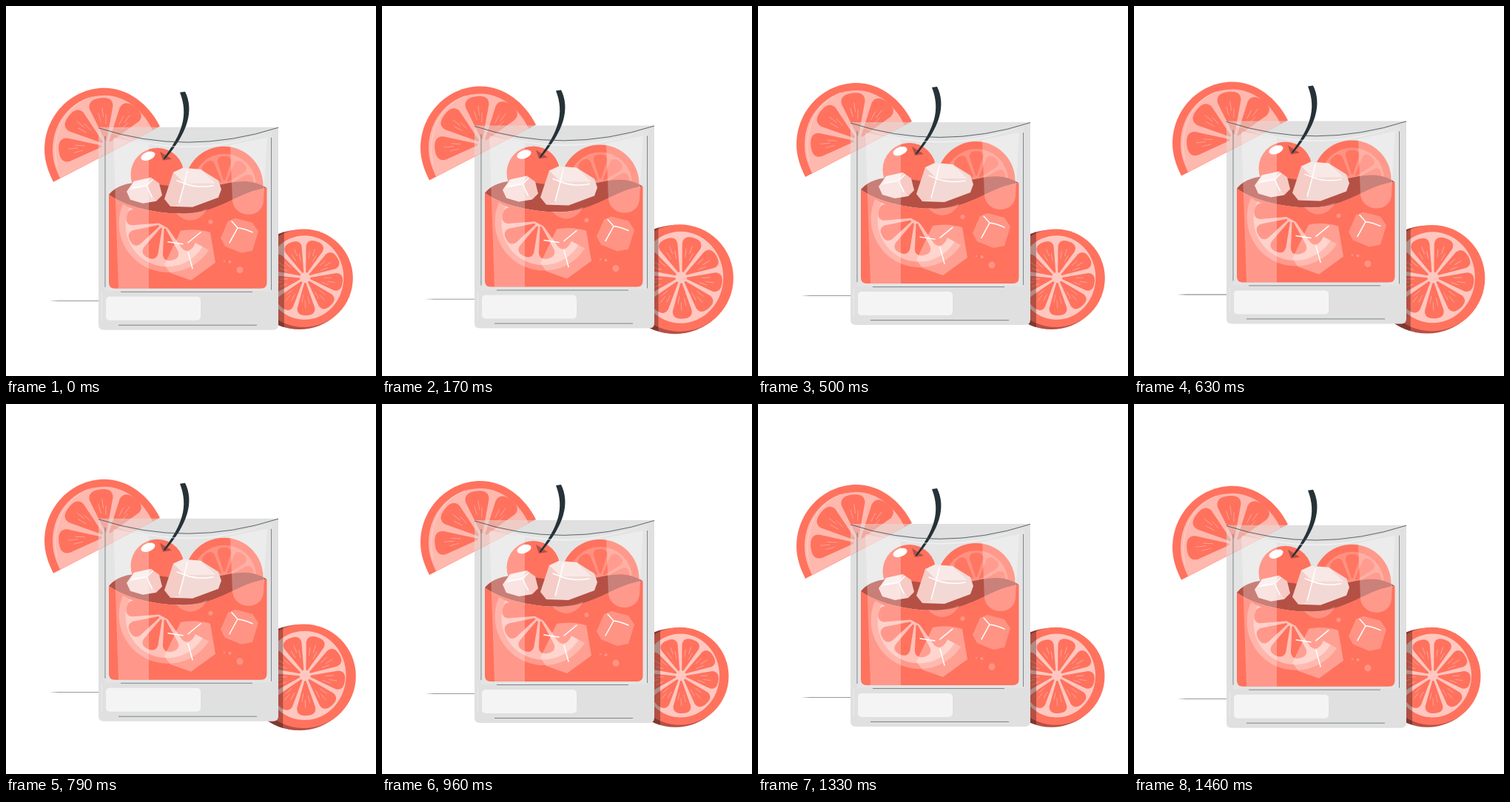
Write an HTML page that moves like this. It is 500x500 px and loops after 1500 ms.

```html
<!DOCTYPE html>
<html lang="en">
<head>
<meta charset="utf-8">
<style>
html, body { margin: 0; height: 100%; overflow: hidden; background: #fff }
svg { display: block; width: 100vw; height: 100vh }
.o { fill: #ff725e }
.d { fill: #b55045 }
.w { fill: #fff }
.line { fill: none; stroke: #37474f; stroke-width: .8 }
.shine { fill: none; stroke: #fff; stroke-width: 1.5; stroke-linecap: round; stroke-linejoin: round }
.fibre { fill: none; stroke: #fff; stroke-width: .7; opacity: .45 }
</style>
</head>
<body>
<svg viewBox="0 0 500 500">
  <clipPath id="shade"><path d="M300 280H376V460H300Z"/></clipPath>
  <g id="fruit">
    <ellipse class="d" cx="396.500" cy="369.700" rx="70" ry="67"/>
    <circle class="o" cx="402.500" cy="367.800" r="66"/>
    <ellipse cx="403.500" cy="367" rx="52.500" ry="56.500" fill="#ffc7bf"/>
    <g id="fruitFlesh"></g>
    <ellipse cx="396.500" cy="369.700" rx="70" ry="67" clip-path="url(#shade)" opacity=".3"/>
  </g>

  <g id="glass">
    <path d="M58 398.600L70 398.200H125V399H70Z" fill="#777"/>
    <path d="M125 164H368V431q0 7-7 7H132q-7 0-7-7Z" fill="#e0e0e0"/>
    <path d="M134 171Q245 201 359 171V386H134Z" fill="#e4e4e4"/>

    <!-- garnish on the rim -->
    <path class="o" d="M64 238C57 224 52 210 52 194 52 149 88 111 133 111 165 111 193 133 208 163Z"/>
    <path d="M73 233C66 218 63 208 63 194 63 154 93 121 133 121 163 121 187 144 198 168Z" fill="#ffb8ae"/>
    <g id="garnishFlesh"></g>
    <path class="fibre" d="M69 217C60 178 77 137 112 124"/>
    <path d="M125 164H207L125 206Z" fill="#e0e0e0" opacity=".5"/>

    <!-- fruit above the surface -->
    <circle class="o" cx="294.500" cy="243" r="53"/>
    <circle class="w" cx="295" cy="243" r="43" opacity=".22"/>
    <g id="sliceFlesh" opacity=".85"></g>
    <circle class="o" cx="204.500" cy="228" r="36"/>
    <ellipse class="w" cx="192" cy="203" rx="10" ry="5.5" transform="rotate(-20 192 203)"/>
    <path class="d" d="M208 197L224 207 212 209Z"/>
    <path d="M235 117L242 116C254 140 247 171 214 208L213 206C238 173 247 148 235 117Z" fill="#263238"/>

    <!-- drink -->
    <path class="d" d="M139 255C165 225 215 246 250 247S320 225 352 246C315 251 285 281 240 281 195 281 155 268 139 255Z"/>
    <path class="o" d="M139 255C155 268 195 281 240 281 285 281 315 251 352.500 246V374q0 8-8 8H147q-8 0-8-8Z"/>
    <path class="w" opacity=".22" d="M230 280Q255 282 272 274 264 289 249 290 237 289 230 280Z"/>
    <path class="w" opacity=".28" d="M158 268A66 66 0 0 0 274 330Z"/>
    <path d="M167 272.500A56 56 0 0 0 265.500 325.500Z" fill="#ffc0b7"/>
    <g id="sunkFlesh"></g>
    <path class="w" opacity=".32" d="M214 350L236 304Q255 300 276 306L283 347 250 371 222 361Z"/>
    <g class="w" opacity=".24">
      <path d="M290 314L300 291 310 287 333 293 341 305 333 331 318 334 296 325Z"/>
      <circle cx="276.500" cy="292" r="3"/><circle cx="302.500" cy="346" r="2"/>
      <circle cx="316" cy="357" r="4.500"/><circle cx="295" cy="345" r="1.200"/>
    </g>
    <path class="shine" d="M219 319L239 322M263 306L246 320M246 333L252 355M305 291L313 300 302 320M313 300Q322 301 333 306"/>

    <!-- floating ice -->
    <path d="M163 251L173 237 196 232 207 240 211 256 203 264 185 267 168 262Z" fill="#f7dad7"/>
    <path class="w" opacity=".45" d="M173 237L196 232 190 244 166 249Z"/>
    <path class="o" opacity=".15" d="M196 232L207 240 211 256 203 264 190 244Z"/>
    <path class="shine" d="M171 246L190 243 198 235M190 243L197 258"/>
    <path d="M214 261L226 225 239 219 263 221 287 236 291 248 287 259 252 272 222 271Z" fill="#f3d9d5"/>
    <path class="w" opacity=".4" d="M226 225L239 219 263 221 283 240 241 240Z"/>
    <path class="o" opacity=".13" d="M214 261L226 225 241 240 234 268 222 271Z"/>
    <path class="shine" d="M234 266L241 240 245 223M231 236L241 240Q260 247 280 243"/>

    <!-- reflections -->
    <path class="w" opacity=".27" d="M145 178L193 187V382H152Z"/>
    <path class="w" opacity=".28" d="M303 188L353 178 348 264C346 288 310 288 306 264Z"/>

    <path class="w" opacity=".5" d="M125 165Q245 218 368 165 245 215 125 165Z"/>
    <path class="line" d="M125 165Q245 204 368 164.500"/>
    <path class="line" d="M134 176V380M358.500 178V384M155 386.500H333M152 431.500H339" stroke-opacity=".75"/>
    <path class="fibre" d="M129.500 388V424"/>
    <rect x="135" y="393" width="128" height="32" rx="5" fill="#f4f4f4"/>
  </g>
</svg>
<script>
const $ = id => document.getElementById(id);

// Fills a group with round-ended citrus wedges pointing at the given angles
function flesh(id, cx, cy, r, angles, half, fibres = true) {
  const x = r * .8, h = x * Math.tan(half * Math.PI / 180);
  $(id).innerHTML = angles.map(a => `<g transform="translate(${cx} ${cy}) rotate(${a})">
    <path class="o" d="M7 -1L${x} ${-h}Q${r} ${-h * 1.1} ${r} 0Q${r} ${h * 1.1} ${x} ${h}L7 1Z"/>
    ${fibres ? `<path class="fibre" d="M${r * .5} -3L${r * .7} -5M${r * .6} 1H${r * .8}M${r * .45} 3L${r * .65} 5"/>` : ''}
  </g>`).join('');
}
const fan = (start, step, n) => Array.from({ length: n }, (_, i) => start + i * step);

flesh('fruitFlesh', 404, 367, 51, fan(-72, 40, 9), 16);
flesh('garnishFlesh', 136, 189, 65, fan(174, 44, 4), 17);
flesh('sliceFlesh', 295, 243, 40, fan(190, 40, 5), 16, false);
flesh('sunkFlesh', 213, 294, 51, fan(39, 38, 5), 14.5, false);

// CSS "ease", cubic-bezier(.25, .1, .25, 1)
function ease(x) {
  let lo = 0, hi = 1, s;
  for (let i = 0; i < 20; i++) {
    s = (lo + hi) / 2;
    if (.75 * s * (1 - s) + s ** 3 < x) lo = s; else hi = s;
  }
  return .3 * s * (1 - s) ** 2 + 3 * s * s * (1 - s) + s ** 3;
}

const LOOP = 1500, BEAT = 500, RISE = 10, SWELL = .1;

function draw() {
  const t = (performance.now() + 15) % LOOP;
  const lift = RISE * (1 - Math.abs(2 * t / LOOP - 1));
  $('glass').setAttribute('transform', `translate(0 ${-lift})`);

  // two beats, then a rest
  const q = t % BEAT / BEAT * 2;
  const beat = t >= 2 * BEAT ? 0 : q < 1 ? ease(q) : 1 - ease(q - 1);
  $('fruit').setAttribute('transform', `translate(402 369.5) scale(${1 + SWELL * beat}) translate(-402 -369.5)`);
  requestAnimationFrame(draw);
}
draw();
</script>
</body>
</html>
```
